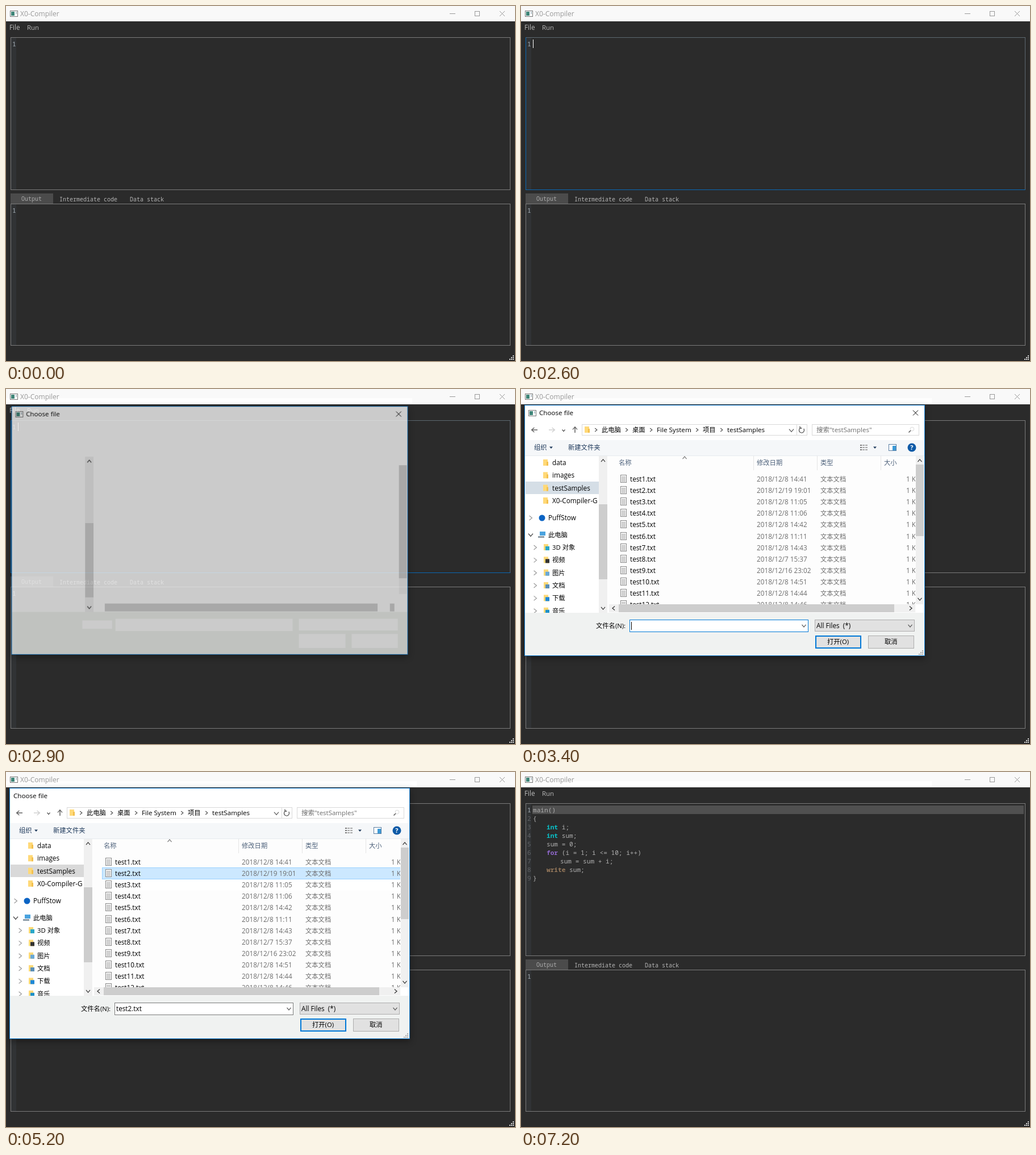
Recreate the animation shown at these times as an HTML page with a canvas. Size 896x625 px, loop 7.3 s.

```html
<!DOCTYPE html>
<html lang="en">
<head>
<meta charset="utf-8">
<title>Compiler window</title>
<style>
html, body { margin: 0; width: 100%; height: 100%; overflow: hidden; background: #2b2b2b; }
canvas { display: block; }
</style>
</head>
<body>
<canvas id="stage" width="896" height="625"></canvas>
<script>
const LOOP = 7300, STEP = 100;
const stage = document.getElementById('stage').getContext('2d');
const layer = document.createElement('canvas');
layer.width = 896;
layer.height = 625;
const dialogCtx = layer.getContext('2d');
let g = stage;

const SANS = '"Open Sans", "Noto Sans CJK SC", "Noto Sans CJK", "Noto Sans", sans-serif';
const MONO = '"Noto Sans Mono", "DejaVu Sans Mono", monospace';
const GREY = '#adadad', BLUE = '#0078d7';

// ---- drawing helpers ----
function rect(x, y, w, h, color) {
  g.fillStyle = color;
  g.fillRect(x, y, w, h);
}
function frame(x, y, w, h, color, width = 1) {
  g.strokeStyle = color;
  g.lineWidth = width;
  g.strokeRect(x + width / 2, y + width / 2, w - width, h - width);
}
function line(color, width, ...p) {
  g.strokeStyle = color;
  g.lineWidth = width;
  g.beginPath();
  for (let i = 0; i < p.length; i += 2) g.lineTo(p[i], p[i + 1]);
  g.stroke();
}
function disc(x, y, r, color) {
  g.fillStyle = color;
  g.beginPath();
  g.arc(x, y, r, 0, 7);
  g.fill();
}
// y is the middle of the capitals
function text(s, x, y, color = '#000', size = /[\u4e00-\u9fff]/.test(s) ? 11.3 : 11.75) {
  g.font = `${size}px ${SANS}`;
  g.fillStyle = color;
  g.fillText(s, x, y + 4);
}
function mono(s, x, y, color, size = 11.13, weight = 400) {
  g.font = `${weight} ${size}px ${MONO}`;
  g.fillStyle = color;
  g.fillText(s, x, y + 4);
}
function chevron(x, y, dir, color = '#555', r = 3) {
  const h = r * 0.6;
  const [dx, dy] = { up: [0, -1], down: [0, 1], left: [-1, 0], right: [1, 0] }[dir];
  line(color, 1.2, x - dx * h - dy * r, y - dy * h - dx * r, x + dx * h, y + dy * h,
    x - dx * h + dy * r, y - dy * h + dx * r);
}
function arrow(x, y, dir, color) {
  const [dx, dy] = { up: [0, -1], left: [-1, 0], right: [1, 0] }[dir];
  line(color, 1.4, x - dx * 5, y - dy * 5, x + dx * 5, y + dy * 5);
  chevron(x + dx * 3, y + dy * 3, dir, color, 4);
}
function triangle(x, y) {
  g.fillStyle = '#1e395b';
  g.beginPath();
  g.moveTo(x - 3, y - 1.5);
  g.lineTo(x + 3, y - 1.5);
  g.lineTo(x, y + 2);
  g.fill();
}
function cross(x, y, r, color) {
  line(color, 1, x - r, y - r, x + r, y + r);
  line(color, 1, x - r, y + r, x + r, y - r);
}
function grip(x, y, color) {
  for (let r = 0; r < 3; r++)
    for (let c = 2 - r; c < 3; c++) rect(x + c * 3, y + r * 3, 2, 2, color);
}
function appIcon(x, y) {
  rect(x, y, 14, 11, '#fff');
  frame(x, y, 14, 11, '#777');
  rect(x + 2, y + 2, 6, 7, '#3f8578');
  rect(x + 10, y + 2, 2, 4, '#b5c4cc');
}
function folder(x, y) {
  rect(x, y - 6, 8, 11, '#ffd978');
  rect(x + 6, y - 2, 3, 7, '#f3c04f');
}
function mix(a, b, k) {
  return `rgb(${a.map((v, i) => Math.round(v + (b[i] - v) * k))})`;
}

// ---- main window ----
const CODE = [
  [0, '', 'main()'], [0, '', '{'],
  [1, 'int', ' i;'], [1, 'int', ' sum;'], [1, '', 'sum = 0;'],
  [1, 'for', ' (i = 1; i <= 10; i++)'], [2, '', 'sum = sum + i;'],
  [1, 'write', ' sum;'], [0, '', '}']
];
const KEYWORD = { int: '#08c4cc', for: '#9068cc', write: '#987a5c' };

function editor(y, h, focused) {
  rect(9, y + 1, 9, h - 2, '#313335');
  frame(8, y, 880, h, '#7b7b7b');
  if (focused) {
    line('#5d6870', 1, 8, y + .5, 887.5, y + .5, 887.5, y + h);
    line('#0a69b5', 1, 8.5, y, 8.5, y + h - .5, 888, y + h - .5);
  }
}

function source() {
  rect(20, 59, 865, 15, '#505050');
  CODE.forEach(([indent, word, rest], i) => {
    const x = 21 + indent * 24, y = 67 + i * 15;
    if (i) mono(String(i + 1), 11, y, '#606366');
    mono(word, x, y, KEYWORD[word], 11.13, 700);
    mono(rest, x + word.length * 6.68, y, '#b0b0b0');
  });
}

function menu() {
  rect(2, 48, 139, 76, '#2b2b2b');
  frame(2, 48, 139, 76, '#555');
  rect(3, 50, 137, 23, '#4b4b4b');
  [['Open', 'Ctrl+O'], ['Save', 'Ctrl+S'], ['Save as', '']].forEach(([name, key], i) => {
    text(name, 14, 61 + i * 24, '#bbb');
    text(key, 92, 61 + i * 24, '#bbb');
  });
  text('Open file', 4, 613, '#bbb');
}

function mainWindow(t) {
  const active = t >= 1100 && t < 2400 || t >= 5300 && t < 7200;
  const focused = t >= 1100 && t < 3000 || t >= 5400 && t < 7200;
  const ink = active ? '#000' : '#999';
  const loaded = t >= 5400;

  rect(0, 0, 896, 625, '#2b2b2b');
  rect(0, 0, 896, 27, '#f9f9f9');
  if (t >= 2800) rect(0, 16, t < 3000 ? 715 : 723, 10, '#fefefe');
  appIcon(7, 8);
  text('X0-Compiler', 25, 14, ink, 12);
  line(ink, 1, 781, 13.5, 791, 13.5);
  frame(825, 9, 9, 9, ink);
  cross(873.5, 13.5, 4.5, ink);

  if (t >= 800 && t < 2600) rect(0, 28, 31, 18, '#4b4b4b');
  text('File', 6, 38, '#bbb');
  text('Run', 37, 38, '#bbb', 11.4);

  editor(55, 269, focused);
  if (loaded) source();
  mono('1', 11, 67, '#a4aeb5');
  const caret = loaded ? Math.floor((t - 5400) / 500) % 2 === 0 && t < 7200 : focused;
  if (caret) rect(21, 59, 1, 15, '#fff');

  rect(8, 330, 75, 18, '#4b4b4b');
  mono('Output', 27, 339, '#aaa', 10);
  mono('Intermediate code', 94, 340, '#b4b4b4', 10);
  mono('Data stack', 218, 340, '#b4b4b4', 10);
  editor(348, 250, false);
  mono('1', 11, 360, '#a4aeb5');
  grip(886, 615, '#ddd');
  rect(0, 624, 896, 1, '#232323');

  if (t >= 1500 && t < 2300) menu();
}

// ---- file dialog ----
const FILES = ['8 14:41', '19 19:01', '8 11:05', '8 11:06', '8 14:42', '8 11:11',
  '8 14:43', '7 15:37', '16 23:02', '8 14:51', '8 14:44', '8 14:46'];
const PLACES = [['3D 对象', '#2aa7c9'], ['视频', '#333'], ['图片', '#6aa9d6'],
  ['文档', '#5a8fb8'], ['下载', '#1e88d8'], ['音乐', '#1e90c8']];

function navigation() {
  arrow(24, 72, 'left', '#555');
  arrow(54, 72, 'right', '#ccc');
  chevron(75, 73, 'down', '#555', 2.5);
  arrow(95, 72, 'up', '#555');
  frame(107, 62, 397, 20, '#d9d9d9');
  folder(112, 72);
  [['此电脑', 142], ['桌面', 196], ['File System', 239], ['项目', 320], ['testSamples', 363]]
    .forEach(([name, x]) => {
      chevron(x - 10, 72, 'right');
      text(name, x, 72, '#000', name > '~' ? 11.3 : 11.65);
    });
  chevron(476, 73, 'down', '#555', 4);
  line('#d9d9d9', 1, 485.5, 62, 485.5, 82);
  g.strokeStyle = '#555';
  g.lineWidth = 1.3;
  g.beginPath();
  g.arc(494, 72.5, 4.5, -.6, 4.4);
  g.stroke();
  line('#555', 1.3, 491, 65.5, 491, 69, 494.5, 69);
  frame(512, 62, 189, 20, '#d9d9d9');
  text('搜索"testSamples"', 520, 72, '#6d6d6d', 11.5);
  g.beginPath();
  g.arc(688.5, 70.5, 3.3, 0, 7);
  g.stroke();
  line('#555', 1.4, 686, 73, 682.5, 76.5);
}

function toolbar() {
  text('组织', 23, 103, '#1e395b');
  triangle(53, 103);
  text('新建文件夹', 83, 103, '#1e395b');
  for (let i = 0; i < 3; i++) {
    rect(597, 98 + i * 4, 3, 2, '#777');
    rect(601, 98 + i * 4, 4, 2, '#aaa');
    rect(606, 98 + i * 4, 4, 2, '#aaa');
  }
  triangle(623, 103);
  rect(647, 97, 14, 12, '#fff');
  frame(647, 97, 14, 12, '#5b7fa3');
  rect(654, 100, 6, 8, '#3d9ad6');
  disc(688, 103, 7.5, '#0d5aa7');
  g.font = `bold 11px ${SANS}`;
  g.fillStyle = '#fff';
  g.fillText('?', 685.3, 107);
}

function tree(t) {
  g.save();
  g.beginPath();
  g.rect(8, 118, 129, 276);
  g.clip();
  const hover = Math.min(3, Math.max(0, (t - 3200) / 100)) / 6 + Math.min(4, Math.max(0, (t - 3600) / 100)) / 8;
  rect(8, 163, 129, 22, t >= 4600 ? '#d9d9d9' : mix([217, 217, 217], [204, 232, 255], hover));
  if (t >= 4000 && t < 4600) frame(7, 163, 130, 22, '#99d1ff');
  ['data', 'images', 'testSamples', 'X0-Compiler-G'].forEach((name, i) => {
    folder(39, 130 + i * 22.3);
    text(name, 55, 130 + i * 22.3);
  });
  chevron(17, 227, 'right', '#999', 4);
  disc(37, 227, 5.5, '#0a64c4');
  text('PuffStow', 48, 227);
  chevron(17, 257, 'down', '#333', 4);
  rect(33, 251, 10, 7, '#4aa3df');
  rect(30, 259, 11, 3, '#8c9aa5');
  text('此电脑', 48, 257);
  PLACES.forEach(([name, color], i) => {
    const y = 279 + i * 22.35;
    chevron(25, y, 'right', '#999', 4);
    folder(40, y);
    rect(43, y - 2, 7, 7, color);
    text(name, 55, y);
  });
  g.restore();
}

function fileList(t) {
  text('名称', 172, 130, '#4c607a');
  text('修改日期', 415, 130, '#4c607a');
  text('类型', 527, 130, '#4c607a');
  text('大小', 639, 130, '#4c607a');
  chevron(288, 121, 'up', '#777', 3.5);
  for (const x of [409, 521, 633]) rect(x, 118, 1, 25, '#e5e5e5');
  g.save();
  g.beginPath();
  g.rect(153, 118, 541, 261);
  g.clip();
  if (t >= 4500) rect(170, 168, 525, 21, t < 4600 ? '#e5f3ff' : '#cce8ff');
  if (t >= 4600) frame(169, 168, 527, 21, '#99d1ff');
  if (t >= 4700) rect(170, 189, 525, 20, t < 4900 ? '#e5f3ff' : '#fff');
  FILES.forEach((stamp, i) => {
    const y = 159 + i * 20.1, top = Math.round(y) - 8;
    rect(175, top, 11, 14, '#fff');
    frame(175, top, 11, 14, '#858585');
    for (let k = 3; k < 12; k += 2) rect(177, top + k, 7, 1, '#a5a5a5');
    text(`test${i + 1}.txt`, 192, y);
    text('2018/12/' + stamp, 415, y, '#6d6d6d');
    text('文本文档', 527, y, '#6d6d6d');
    text('1 KB', 678, y, '#6d6d6d');
  });
  g.restore();
}

function scrollbars(blank) {
  const thumb = blank ? '#d2d2d2' : '#cdcdcd';
  rect(137, 118, 15, 276, '#f0f0f0');
  rect(137, blank ? 236 : 203, 15, 132, thumb);
  chevron(144.5, 126, 'up', '#333', 3.5);
  chevron(144.5, 386, 'down', '#333', 3.5);
  rect(695, 118, 14, 261, blank ? '#fff' : '#f0f0f0');
  rect(695, 133, 14, blank ? 201 : 126, thumb);
  if (blank) {
    rect(695, 334, 14, 28, '#f4f4f4');
    rect(172, 379, 485, 14, thumb);
    rect(679, 379, 8, 14, thumb);
    return;
  }
  chevron(702, 126, 'up', '#333', 3.5);
  chevron(702, 370, 'down', '#333', 3.5);
  rect(155, 379, 539, 14, '#f0f0f0');
  rect(172, 379, 485, 14, thumb);
  chevron(163, 386, 'left', '#333', 3.5);
  chevron(686, 386, 'right', '#333', 3.5);
}

function footer(t) {
  const picked = t >= 4600;
  text('文件名(N):', 132, 417);
  rect(191, 406, 315, 22, '#fff');
  frame(191, 406, 315, 22, picked ? '#7a7a7a' : BLUE);
  if (picked) text('test2.txt', 194, 417);
  else if (t < 3500 || t >= 4000 && t < 4400) rect(194, 410, 1, 14, '#000');
  chevron(498, 417, 'down', '#555', 3.5);
  rect(517, 406, 176, 21, '#e1e1e1');
  frame(517, 406, 176, 21, GREY);
  text('All Files  (*)', 520, 417);
  chevron(685, 417, 'down', '#555', 3.5);
  rect(518, 434, 81, 23, '#e1e1e1');
  frame(518, 434, 81, 23, BLUE, 2);
  text('打开(O)', 539, 445);
  rect(611, 434, 81, 23, '#e1e1e1');
  frame(611, 434, 81, 23, GREY);
  text('取消', 640, 445);
  grip(700, 460, '#aaa');
}

function dialog(t) {
  const blank = t < 3000;
  g.clearRect(0, 0, 896, 625);
  rect(7, 28, 704, 442, '#fff');
  if (!blank) {
    rect(7, 90, 704, 28, '#f5f7f9');
    rect(7, 117, 704, 1, '#e6eaee');
    rect(153, 118, 542, 276, '#fdfdfd');
  }
  rect(7, 394, 704, 76, blank ? '#f1f4f0' : '#f0f2f1');
  scrollbars(blank);
  if (t < 5200) {
    appIcon(13, 37);
    cross(694.5, 42, 4.5, '#000');
  }
  text('Choose file', t < 5200 ? 32 : 13, 42, '#000', 11.65);
  if (blank) {
    [[132, 409, 53, 15], [191, 406, 315, 22], [517, 406, 176, 21], [517, 433, 83, 25], [611, 433, 82, 25]]
      .forEach(b => rect(...b, '#fff'));
  } else {
    navigation();
    toolbar();
    tree(t);
    fileList(t);
    footer(t);
  }
  frame(6, 28, 705, 442, '#1883d7');
}

// opacity and scale while the dialog opens and closes
const FADE = { 2800: [.35, .96], 2900: [.77, .99], 3000: [.95, .998], 5300: [.4, .96] };

function render(t) {
  g = stage;
  mainWindow(t);
  if (t < 2800 || t >= 5400) return;
  g = dialogCtx;
  dialog(t);
  const [alpha, scale] = FADE[t] || [1, 1];
  stage.save();
  stage.globalAlpha = alpha;
  stage.shadowColor = 'rgba(0,0,0,.4)';
  stage.shadowBlur = 12;
  stage.shadowOffsetY = 4;
  stage.translate(358.5, 248.5);
  stage.scale(scale, scale);
  stage.drawImage(layer, -358.5, -248.5);
  stage.restore();
}

function tick() {
  render(Math.floor(performance.now() % LOOP / STEP) * STEP);
  requestAnimationFrame(tick);
}
tick();
</script>
</body>
</html>
```
